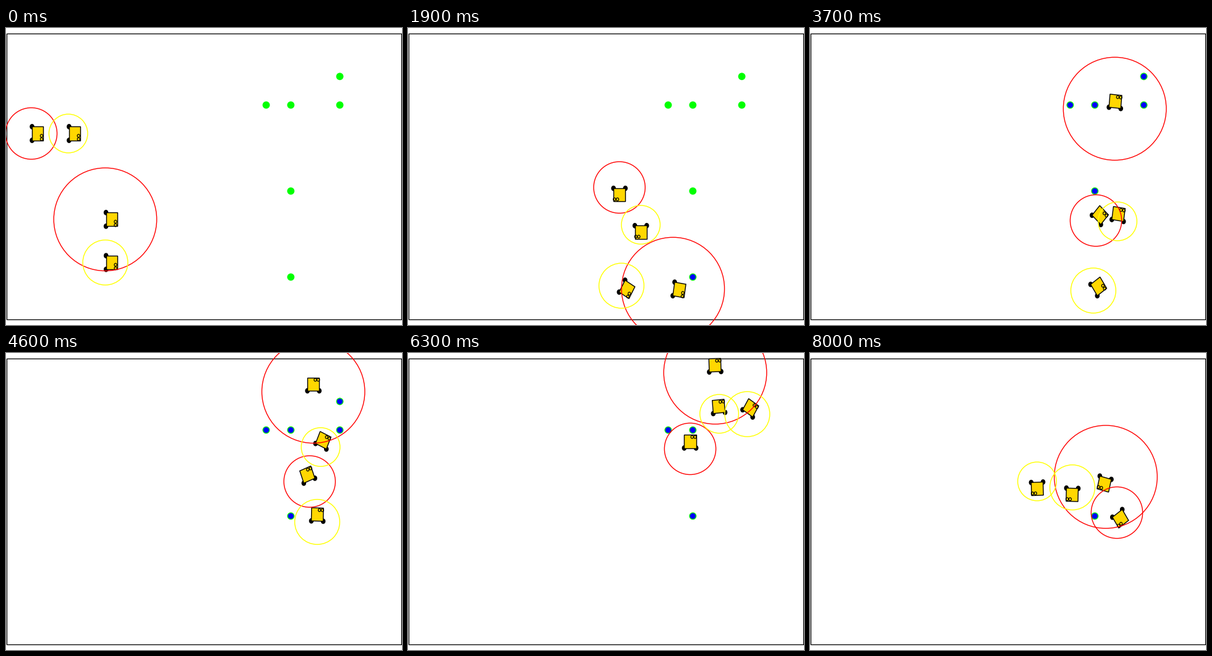
Write a matplotlib script that moves like this. It is 640x480 px and loops after 8100 ms.

```python
import numpy as np
import matplotlib.pyplot as plt
from matplotlib.animation import FuncAnimation
from matplotlib.patches import Circle, Polygon, Rectangle

W, H, FRAMES = 640, 480, 81
UNIT = np.array([39.9, 46.2])  # pixels per world unit, x and y
REACH = 27  # a carrier this close picks an item up

# Key poses: frame, x, y, heading in degrees (0 right, 90 down)
SCOUT = [(0, 40.9, 170.5, 0), (9, 235, 170.5, 0), (14, 304, 176, 30),
         (19, 341.7, 257.7, 90), (28, 372.3, 365, 1), (46, 490.7, 207.7, -111),
         (63, 456, 154.9, -90), (72, 430, 246, 60), (80, 496, 258, 56)]
PICKER = [(0, 100.7, 170.5, 0), (9, 298.7, 170.5, 0), (14, 374, 218, 80),
          (19, 376.2, 318, 90), (28, 426, 374.3, 5), (36, 494, 330, -75),
          (46, 508.5, 152, -66), (49, 529, 122, -80), (63, 503, 98.3, -95),
          (72, 392, 150, 150), (80, 367, 207.5, 88)]
LEADER = [(0, 160.4, 309.3, 0), (9, 357, 309.3, 0), (14, 402, 365, 95),
          (19, 428.3, 421.5, 9), (23, 491, 388, -75), (28, 491.6, 281, -90),
          (36, 492, 138, -85), (46, 496.7, 62.5, -90), (63, 496.5, 31.7, -92),
          (72, 474, 62, 95), (80, 478, 200.2, 104)]
HAULER = [(0, 160.5, 379, 0), (9, 319.6, 379, 0), (19, 345, 416.5, 30),
          (28, 405.5, 437.3, 12), (36, 445, 432, -20), (46, 503, 273, -88.5),
          (63, 548.3, 98.8, -58), (72, 470, 130, 150), (80, 424, 217.2, 91.5)]
ITEMS = [(420.5, 124.5), (460.3, 124.5), (539.5, 124.5),
         (539.5, 78.3), (460.3, 263.5), (460.3, 402.5)]

fig = plt.figure(figsize=(W / 72, H / 72), dpi=72, facecolor="white")
ax = fig.add_axes([0, 0, 1, 1])
ax.set(xlim=(0, W), ylim=(H, 0))
ax.axis("off")
ax.add_patch(Rectangle((1.2, 9), 638, 462, fill=False, lw=1.3))


def drive(poses):
    """Cubic path through the poses, always moving along the heading."""
    t, x, y, heading = np.array(poses).T
    points = np.column_stack([x, y]) / UNIT
    angle = np.radians(heading)
    ahead = np.column_stack([np.cos(angle), np.sin(angle)])
    frame = np.arange(FRAMES)
    k = np.clip(np.searchsorted(t, frame, "right") - 1, 0, len(t) - 2)
    u = ((frame - t[k]) / (t[k + 1] - t[k]))[:, None]
    a, b = points[k], points[k + 1]
    length = np.linalg.norm(b - a, axis=1, keepdims=True)
    m, n = ahead[k] * length, ahead[k + 1] * length
    place = a + (b - a) * u**2 * (3 - 2 * u) + u * (1 - u) * ((1 - u) * m - u * n)
    speed = 6 * u * (1 - u) * (b - a) + (1 - u) * (1 - 3 * u) * m + u * (3 * u - 2) * n
    return place * UNIT, speed / np.linalg.norm(speed, axis=1, keepdims=True)


def disc(forward, side, r):
    a = np.linspace(0, 2 * np.pi, 25)
    return np.column_stack([forward + r * np.cos(a), side + r * np.sin(a)])


class Robot:
    def __init__(self, poses, radius, color):
        self.path, self.ahead = drive(poses)
        box = np.array([(.03, -.24), (.49, -.24), (.49, .24), (.03, .24)])
        self.parts = [self.part(disc(.03, s, .095), "black", 0, 2) for s in (-.24, .24)]
        self.parts.append(self.part(box, "gold", 1.4, 3))
        self.parts += [self.part(disc(.415, s, .052), "none", 1.2, 4) for s in (.08, .2)]
        self.ring = ax.add_patch(Circle((0, 0), radius, fill=False, ec=color, lw=1.4, zorder=6))

    def part(self, shape, fill, lw, z):
        patch = ax.add_patch(Polygon(shape, fc=fill, ec="black", lw=lw, zorder=z))
        return patch, shape

    def place(self, i):
        c, s = self.ahead[i]
        turn = np.array([(c, s), (-s, c)])
        for patch, shape in self.parts:
            patch.set_xy(shape @ turn * UNIT + self.path[i])
        self.ring.center = self.path[i]

    def first_within(self, point, distance):
        near = np.hypot(*(self.path - point).T) < distance
        return int(near.argmax()) if near.any() else FRAMES


class Item:
    def __init__(self, point, seekers, carriers):
        self.seen = min(r.first_within(point, r.ring.radius) for r in seekers)
        self.gone = min(r.first_within(point, REACH) for r in carriers)
        self.base = ax.add_patch(Circle(point, 5.9, fc="lime", lw=0, zorder=1))
        self.core = ax.add_patch(Circle(point, 4.6, fc="blue", lw=0, zorder=1.5))

    def place(self, i):
        self.base.set_visible(i < self.gone)
        self.core.set_visible(self.seen <= i < self.gone)


seekers = [Robot(SCOUT, 41.6, "red"), Robot(LEADER, 83.2, "red")]
carriers = [Robot(PICKER, 31.3, "yellow"), Robot(HAULER, 36.4, "yellow")]
items = [Item(point, seekers, carriers) for point in ITEMS]


def draw(i):
    for thing in seekers + carriers + items:
        thing.place(i)
    return []


anim = FuncAnimation(fig, draw, frames=FRAMES, interval=100, repeat=True, repeat_delay=0)
plt.show()
```
